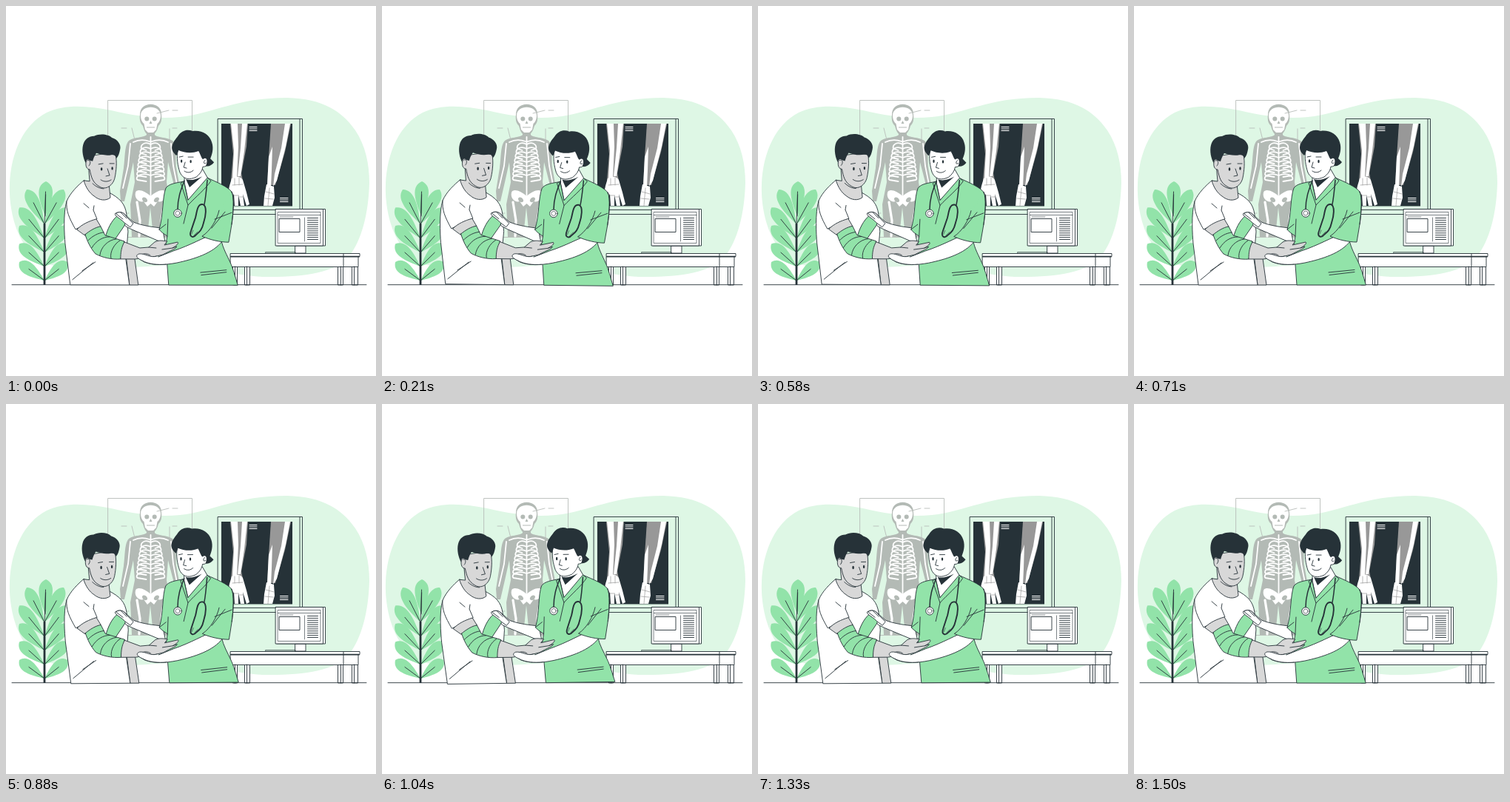
An HTML page that plays this animation: 500 px wide and 500 px high, repeating every 1540 ms.

```html
<!DOCTYPE html>
<html lang="en">
<head>
<meta charset="utf-8">
<title>Bandaging an arm</title>
<style>
  html, body { margin: 0; width: 100%; height: 100%; overflow: hidden; background: #fff; }
  svg { display: block; width: 100%; height: 100%; }
  path, rect, circle, ellipse { stroke-linecap: round; stroke-linejoin: round; }
  .ink { stroke: #263238; stroke-width: .9; }
  .line { fill: none; stroke: #263238; stroke-width: .9; }
  .thin { fill: none; stroke: #263238; stroke-width: .6; }
  .dark { fill: #263238; }
  .green { fill: #92e3a9; }
  .pale { fill: #def7e5; }
  .white { fill: #fff; }
  .skin { fill: #d8d8d8; }
  .body { fill: #b3bab5; }
  .ribs { fill: none; stroke: #fff; stroke-width: 1.8; }
  .flesh { fill: #989898; }
  .crease { fill: none; stroke: #989898; stroke-width: .7; }
  .grey { fill: none; stroke: #b8bdb9; stroke-width: .9; }
</style>
</head>
<body>
<svg viewBox="0 0 500 500">
  <path class="pale" d="M5 240C7 197 24 160 55 144C80 132 112 135 142 141C177 149 205 153 235 150C282 145 310 124 380 124C428 125 455 143 472 168C486 189 491 214 491 239C490 279 481 317 463 339C445 361 398 367 347 366C302 364 264 347 218 350C172 354 110 356 66 351C24 345 3 290 5 240Z"/>

  <g id="poster">
    <rect class="grey" x="138" y="127.5" width="113.5" height="185"/>
    <path class="body" d="M190 165V174C187 178 172 177 166 182C160 188 161 205 159 219L154 250L155 264L160 264L166 238L172 211L174 238L168 268L170 312H191L195 272L199 312H218L222 268L217 238L219 211L226 238L232 264L238 263L235 245L230 218C229 205 231 188 225 182C218 177 203 178 201 174V165Z"/>
    <path class="body" d="M181 147C180 128 211 128 210 147C211 155 209 159 206 162C204 170 200 175 195 175C190 175 187 170 185 162C182 159 180 155 181 147Z"/>
    <path class="white" d="M182 148C182 133 209 133 209 148C209 153 207 157 204.500 159L203 167L199 171H192L188 167L186.500 159C184 157 182 153 182 148Z"/>
    <g class="body"><circle cx="190.3" cy="152.5" r="3"/><circle cx="200.7" cy="152.5" r="3"/>
      <path d="M195.5 155L193.5 159H197.5ZM190 163.500H201V164.500H190Z"/></g>
    <path id="ribs" class="ribs"/>
    <path class="ribs" d="M195.5 177V256M194 183C186 180 178 181 172 184M197 183C205 180 213 181 219 184M168 186L165 216L158 246M223 186L226 216L232 246"/>
    <path class="white" d="M175 252C177 246 188 250 195.5 257C203 250 214 246 216 252C218 261 210 266 205 264L200 271L195.5 267L191 271L186 264C181 266 173 261 175 252Z"/>
    <path class="body" d="M184 260C187 256 192 261 191 264C188 267 184 264 184 260ZM207 260C204 256 199 261 200 264C203 267 207 264 207 260Z"/>
    <path class="ribs" style="stroke-width:3.2" d="M177 265L181 290L180 311M214 265L210 290L211 311"/>
    <path class="grey" d="M204 145L220 141M225 141H232M156 165H163M170 165L174 181M221 181V166M225 165H231M158 280H166"/>
  </g>

  <g id="xray">
    <rect class="ink pale" x="286.5" y="152.5" width="114" height="129"/>
    <path class="line" d="M397 152.500V275.500H287"/>
    <rect class="dark" x="291" y="159" width="96" height="111.5"/>
    <path class="flesh" d="M303 159H327L325 190L318 226L320 236H304L307 200Z"/>
    <path class="white" d="M304 159H313L314 190L312 232L306 233L308 195ZM319 159H326L322 196L317 230L313 230L317 192ZM305 233C310 229 317 230 320 235L325 252L329 268L325 270L320 254L322 270H317L314 255V270H309L308 254L304 261L299 258L302 243Z"/>
    <path class="crease" d="M306 242L320 241M309 233V242M315 232V242M301 253H306M308 256H314M316 258H321"/>
    <path class="flesh" d="M358 159H385L377 197L364 242H353L355 204Z"/>
    <path class="white" d="M377 159H384L378 190L366 236L361 244L363 227L372 192ZM355 204L360 190L359 222L358 245L353 243ZM352 241L362 244L363 259L360 270H348L349 257Z"/>
    <path class="crease" d="M351 251L362 254M350 260L361 261M356 246L354 270"/>
    <path style="stroke:#fff;stroke-width:1" d="M329 163.500H339M329 166H339M329 168.500H339M370.500 259.500H381M370.500 262H381M370.500 264.500H381"/>
  </g>

  <g id="plant">
    <g id="leaves"></g>
    <path style="stroke:#263238;stroke-width:2.8;stroke-linecap:butt" d="M52 294V377"/>
    <path class="line" d="M52 296L53.500 251"/>
  </g>

  <g id="desk" class="white">
    <path class="ink" d="M306.500 352V377H312.500V352M322.500 352V377H329.500V352M448.500 352V377H455.500V352M467.500 352V377H475.500V352"/>
    <rect class="ink" x="303.500" y="338.500" width="172.500" height="14"/>
    <rect class="ink" x="303.500" y="334.500" width="174.500" height="4"/>
    <path class="line" style="stroke-width:1.700" d="M304 338.700H477"/>
    <path class="line" d="M456 335V352M309.500 352V377M325.500 352V377M452.500 352V377M470.500 352V377"/>
    <path class="ink" d="M391 324H405V334H391Z"/>
    <path class="thin" d="M351 332.500H391V334H351Z"/>
    <rect class="ink" x="366" y="274.500" width="65.500" height="49.500"/>
    <rect class="ink" x="364.500" y="274.500" width="64" height="49.500"/>
    <rect class="thin" x="367.500" y="278.500" width="57.500" height="42"/>
    <rect class="ink" x="369.500" y="287.500" width="27.500" height="18"/>
    <path class="thin" d="M367.500 282.500H425M403.500 286V318M370 285H388"/>
    <path id="rows" class="line"/>
  </g>

  <path class="line" d="M8 376.700H487"/>

  <g id="people">
    <g id="patient">
      <path class="skin ink" d="M160 334L163 343L167 377H179L173 334Z"/>
      <path class="white ink" d="M105 236C98 242 87 252 82 264C77 281 79 309 80 321L87 377H167L162 342L165 305L163 282C161 267 154 260 139 252Z"/>
      <path class="skin ink" d="M111 213L113 237L105 236C108 246 113 253 119 257C126 263 135 264 141 259L139 240Z"/>
      <path class="skin ink" d="M113 203C106 207 106 221 113 221C115 231 117 239 126 244C135 250 145 242 147 232C149 222 150 211 148 201L132 200Z"/>
      <path class="dark" d="M108 213C104 206 102 196 104 188C106 180 112 176 119 176C126 172 138 173 143 178C150 180 156 187 154 194C153 199 152 203 149 206C148 202 146 201 143 201C136 203 128 201 122 199C119 203 118 207 117 210L113 209C110 206 107 208 108 213Z"/>
      <path class="line" d="M110 209C114 207 115 213 112 216M137 220L140 229L135 230M128 235C132 238 138 238 142 235M125 214L131 213M140 213L146 213M117 240C122 245 128 247 132 247M104 268C105 272 110 273 115 270M104 262L111 270M90 370L118 347M103 358L121 346"/>
      <ellipse class="dark" cx="129" cy="220.500" rx="1.300" ry="2.200"/><ellipse class="dark" cx="143.500" cy="219.500" rx="1.200" ry="2.200"/>
      <path class="dark" d="M89 291L97 303L107 298Z"/>
      <path class="white ink" d="M82 264C81 277 85 286 94 302L123 288L118 276"/>
      <path class="white" d="M83 266L118 280L117 268L100 255Z"/>
      <path class="line" d="M105 267L112 273M118 276L119 270"/>
      <path class="skin ink" d="M96 302C103 295 112 291 122 288L128 298L107 310Z"/>
    </g>

    <g id="nurse">
      <path class="white ink" d="M211 300C200 299 184 297 172 292L160 281C156 278 149 278 149 281L161 290L157 291L162 298L170 302L205 317L215 320Z"/>
      <path class="green ink" d="M240 237C230 239 220 240 216 246C211 258 213 282 207 302C211 307 216 309 218 311L216 323L220 377H313.500C310 366 307 354 303 346C299 337 293 327 291 316L305 251C300 244 285 238 272 232Z"/>
      <path class="white ink" d="M241 232L241 239L246 262L274 235L266 221Z"/>
      <path class="dark" d="M243 234C248 236 256 235 265 230L248 245Z"/>
      <path class="white ink" d="M232 195C230 205 232 216 235 225C240 235 248 235 257 231C262 227 265 223 266 217C274 218 276 205 268 204L266 193L240 190Z"/>
      <path class="dark" d="M224 191C225 184 229 180 232 176C237 168 245 166 252 169C263 167 275 173 278 184C281 193 278 201 276 206L281 211C278 215 274 217 270 216C273 209 271 203 266 207C264 206 263 201 260 196C250 200 240 198 233 195C232 198 231 201 230 202C227 199 224 196 224 191Z"/>
      <path class="line" d="M269 208C266 211 267 214 270 212M242 211L240 218L244 219M241 223C245 226 250 225 253 222M234 204L239 203M246 204L253 204"/>
      <ellipse class="dark" cx="237" cy="209.500" rx="1.200" ry="2.200"/><ellipse class="dark" cx="249.500" cy="210" rx="1.200" ry="2.200"/>
      <path class="green ink" d="M240 237L236 239L246 269C256 258 270 247 277 236L272 232L246 262Z"/>
      <path class="line" d="M246 269L240 294M207 302L216 295M219 288L218 311M263 360L298 356.500M298 359.500L264 363.500"/>
      <path class="white ink" d="M285 306C266 313 250 323 226 331L201 341L188 336C181 333 174 335 176 339L187 346C200 351 215 350 231 347C254 342 280 334 292 318Z"/>
      <path class="green ink" d="M305 251C309 258 307 280 305 295L301 319C290 319 276 316 265 311C276 304 285 289 288 276"/>
      <path class="green" d="M291 274L305 252L306 282L290 308L282 298Z"/>
      <path class="line" d="M305 251C309 258 307 280 305 295M305 279L282 288M296 278L278 300"/>
      <path class="line" style="stroke-width:1.500" d="M241 236C236 249 232 259 232 275M272 235C271 246 270 258 268 268"/>
      <circle class="white ink" cx="232" cy="280" r="5.300"/><circle class="thin" cx="232" cy="280" r="3"/>
      <path class="line" style="stroke-width:1.900" d="M266 268C258 267 258 279 256 286L250 304C247 312 253 314 257 309C262 305 265 302 267 293C270 284 272 270 266 268Z"/>
      <path class="thin" d="M251 308L253 303M254 310L259 305"/>
    </g>

    <g id="bandage">
      <path class="green ink" d="M134 314C137 301 143 290 150 284C153 287 159 288 162 292L160 297L147 316Z"/>
      <path class="green ink" d="M107 309C113 304 121 299 128 298L134 310L160 318L155 342C143 343 130 340 121 335C114 327 110 318 107 309Z"/>
      <path class="line" d="M111 317C117 311 124 307 132 306M116 327C122 317 131 312 140 312M127 337C128 326 138 316 149 315M142 341C140 332 147 321 154 317"/>
      <path class="skin ink" d="M160 319L181 327L193 326L201 319C207 316 211 317 218 318L214 323L232 319C234 321 230 324 225 327L231 325C229 329 223 330 220 332L212 336L204 338C193 340 186 340 175 342H155C155 333 156 326 160 319Z"/>
      <path class="line" d="M225 327L211 329M193 326L203 327M181 337C186 334 191 334 195 337"/>
      <path class="white ink" d="M149 280C155 277 159 279 163 285L172 294L168 299L160 293C157 289 152 287 148 283C147 281 147 280 149 280Z"/>
      <path class="line" d="M149 281L158 288M155 279L163 287"/>
      <path class="white ink" d="M204 338C195 341 188 334 180 335C174 337 177 341 184 344C193 349 205 350 216 349"/>
    </g>
  </g>
</svg>

<script>
const get = id => document.getElementById(id);
const range = (n, f) => Array.from({ length: n }, (_, i) => f(i)).join('');

// One leaf from its foot on the stem to its tip, widest near the tip, with a short vein.
function leaf(x, y, tipX, tipY, width) {
  const dx = tipX - x, dy = tipY - y, len = Math.hypot(dx, dy);
  const at = (along, side) =>
    `${x + dx * along - dy / len * side} ${y + dy * along + dx / len * side}`;
  const near = width * .6, far = width * 1.25;
  return `<path class="green" d="M${x} ${y}C${at(.4, -near)} ${at(.85, -far)} ${at(1, 0)}C${at(.85, far)} ${at(.4, near)} ${x} ${y}Z"/>` +
    `<path class="line" d="M${x} ${y}L${at(.62, 0)}"/>`;
}

get('leaves').innerHTML = leaf(53, 284, 54, 237, 13) + range(5, i => {
  const y = 295 + i * 19, tip = 248 + i * 24.5, spread = i ? 34 : 24;
  return leaf(52, y, 52 - spread, tip, 12) + leaf(52, y, 54 + spread - (i ? 5 : 0), tip, 12);
});

get('ribs').setAttribute('d', range(8, i => {
  const y = 187 + i * 6, w = 11 + 7 * Math.sin((i + 1) / 6);
  return [-1, 1].map(s => `M195.5 ${y}C${195.5 + s * w * .7} ${y - 5} ${195.5 + s * w * 1.25} ${y + 2} ${195.5 + s * w} ${y + 6}L${195.5 + s * 6} ${y + 8}`).join('');
}));

get('rows').setAttribute('d', range(11, i => `M407.5 ${286.5 + i * 2.9}H421.5`));

// Sway at 24 steps a second: linear between 0, +1 and -1 degrees
// at 0, 25 and 75 % of the period, entered one step in.
const LOOP = 1540, PERIOD = 1500, STEP = PERIOD / 36;
function sway(ms) {
  const step = Math.floor(ms % LOOP / STEP) + 1;
  const p = step % 36 / 36;
  return p < .25 ? 4 * p : p < .75 ? 2 - 4 * p : 4 * p - 4;
}

const people = get('people');
function draw() {
  people.setAttribute('transform', `rotate(${sway(performance.now())} 196 272)`);
  requestAnimationFrame(draw);
}
draw();
</script>
</body>
</html>
```
